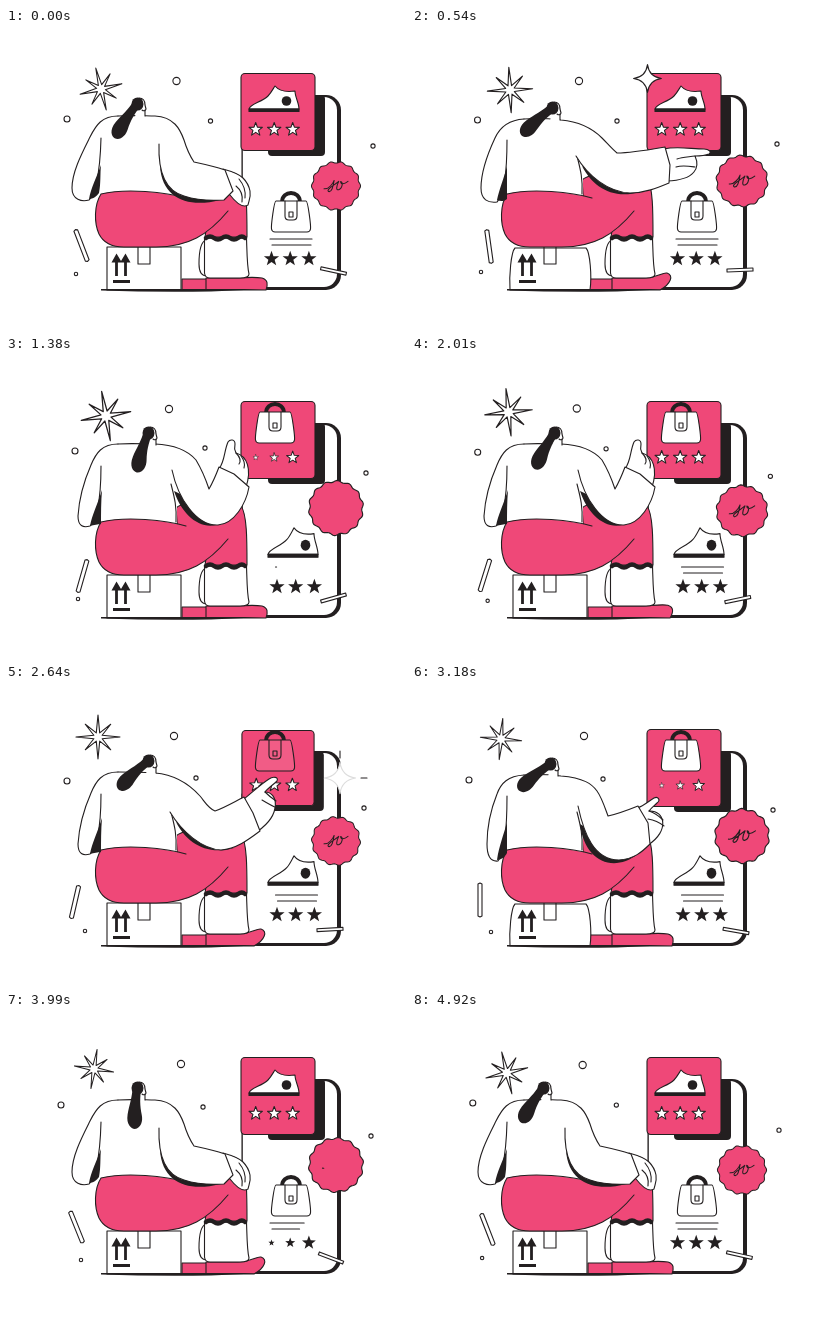
Animation of 400x300 px, one loop 4.95 s. Source, as an HTML page:

```html
<!DOCTYPE html>
<html lang="en">
<head>
<meta charset="utf-8">
<title>Rating products</title>
<style>
html, body { margin: 0; width: 100%; height: 100%; overflow: hidden; background: #fff; }
svg { display: block; width: 100vw; height: 100vh; }
.ln { fill: none; stroke: #231f20; stroke-width: 1.1; stroke-linecap: round; stroke-linejoin: round; }
.w { fill: #fff; }
.p { fill: #ef4878; }
.k { fill: #231f20; }
</style>
</head>
<body>
<svg viewBox="0 0 400 300">
  <g id="phone">
    <rect class="k" x="236" y="67" width="99" height="195" rx="15"/>
    <rect class="w" x="236.6" y="69" width="94.4" height="190" rx="13"/>
    <path class="ln" d="M236 110V252"/>
    <path id="line1" class="ln"/><path id="line2" class="ln"/>
    <g id="phoneStars"></g>
  </g>
  <g id="card">
    <rect class="k" x="262" y="67" width="57" height="61" rx="4"/>
    <rect class="ln p" x="235" y="45.5" width="74" height="77" rx="4"/>
    <g id="cardStars"></g>
  </g>
  <g id="shoe">
    <path class="ln w" d="M-25 9C-24 4-12 2-6-4C-3-7-1-11 1-14C6-8 14-8 21-9C21-3 25 3 25 9Z"/>
    <path class="ln k" d="M-25 9H25V11.500H-25Z"/>
    <circle class="k" cx="12.500" cy="1" r="4.800"/>
  </g>
  <g id="bag">
    <path class="ln" style="stroke-width:3.8" d="M-9-10C-9-22 9-22 9-10"/>
    <path id="bagBody" class="ln" d="M-15-11H15C17-11 20 14 19.500 17Q19 20 16 20H-16Q-19 20-19.500 17C-20 14-17-11-15-11Z"/>
    <path class="ln" d="M-6-11V4Q-6 8-2 8H2Q6 8 6 4V-11M-2 0H2V5H-2Z"/>
  </g>
  <g id="badge">
    <path id="seal" class="ln p"/>
    <path id="scribble" class="ln" pathLength="100"
      d="M-13 3C-8 4-3-3-2-6C-3-1-4 7-8 6C-11 4-3 0 3-5C0 1 0 5 3 4C7 3 8-5 5-5C5-1 9-2 13-5"/>
  </g>
  <g id="legs">
    <path class="ln w" d="M200 212C194 214 193 228 193 236C193 244 196 248 201 248"/>
    <path class="ln p" d="M176 251H204V262H176Z"/>
    <path id="toe" class="ln p"/>
    <path class="ln w" d="M198.500 210V245Q199 250 204 250H234Q243 250 243 246C241 238 241 224 240.500 210Z"/>
    <path class="ln p" d="M170 152C180 143 226 138 235 150C241 158 241 184 241 209H199L201 196L172 180Z"/>
    <path class="ln" style="stroke-width:4.500" d="M200 210Q204 207 208 210T216 210T224 210T232 210T239 210"/>
  </g>
  <path id="box" class="ln w"/>
  <path class="ln" d="M132 219V236H144V219"/>
  <path class="ln" style="stroke-width:2.800;stroke-linecap:butt" d="M110.500 248V230M119.500 248V230M107 253.500H124"/>
  <path class="k" d="M105.500 234.500L110.500 225.500L115 233L119.500 225.500L124.500 234.500Z"/>
  <path class="k" d="M95 261H260L205 263.500Q150 264.500 95 262.500Z"/>
  <path class="w" d="M112 92H150C164 98 171 125 171 148V176H92L94 110Z"/>
  <path class="ln" d="M165 128C168 140 171 150 170 166"/>
  <path class="p" d="M95 166C120 160 160 164 186 172H222V183C202 207 182 219 150 219H118C104 219 97 214 93 206C88 195 88 177 95 166Z"/>
  <path class="ln" d="M180 170C160 164 120 160 95 166C88 177 88 195 93 206C97 214 104 219 118 219H150C182 219 202 207 222 183"/>
  <path id="left" class="ln w"/>
  <path id="sliver" class="k"/>
  <path id="shade" class="k"/>
  <path id="hand" class="ln w"/>
  <path id="crease" class="ln"/>
  <path id="arm" class="ln w"/>
  <g id="head">
    <path class="w" d="M2-6C8-6 8-1 8 1L9 5L8 7V13H-2Z"/>
    <path class="ln" d="M2-6C8-6 8-1 8 1L9 5L8 7V12M5 6Q7 7.500 8 6"/>
    <ellipse class="k" cx="0.500" cy="0" rx="6" ry="6.600"/>
    <path id="tail" class="k" d="M-4.500-1C-4 9-7 18-8 27C-9 37-4 41 0 41C6 40 8 33 6 26C4 18 3 10 4.500-1Z"/>
  </g>
  <g id="floats"></g>
  <path id="sparkle" class="ln w"/>
  <path id="ticks" class="ln"/>
</svg>
<script>
const LOOP = 4950;
const $ = id => document.getElementById(id);
const set = (el, name, value) => el.setAttribute(name, value);
const clamp = v => Math.max(0, Math.min(1, v));
const ramp = (t, start, len) => clamp((t - start) / len);
const ease = p => p < .5 ? 2 * p * p : 1 - 2 * (1 - p) ** 2;
const smooth = p => p * p * (3 - 2 * p);
const lerp = (a, b, k) => a + (b - a) * k;

// Blend two paths that share the same commands
const NUM = /-?\d+(\.\d+)?/g;
function mix(a, b, k) {
  const n = b.match(NUM);
  let i = 0;
  return a.replace(NUM, v => lerp(+v, +n[i++], k).toFixed(2));
}

// Periodic spline through values at shared times
const TIMES = [0, 540, 1380, 2640, 3180, 3990];
function wave(vals, t) {
  const n = TIMES.length;
  const at = i => TIMES[(i + n) % n] + Math.floor(i / n) * LOOP;
  const val = i => vals[(i + n) % n];
  const slope = i => (val(i + 1) - val(i - 1)) / (at(i + 1) - at(i - 1));
  let i = n - 1;
  while (TIMES[i] > t) i--;
  const len = at(i + 1) - at(i), u = (t - at(i)) / len, v = 1 - u;
  return val(i) * (1 + 2 * u) * v * v + slope(i) * len * u * v * v
    + val(i + 1) * u * u * (3 - 2 * u) - slope(i + 1) * len * u * u * v;
}

// 1 when shown; hides and shows twice per loop
const shown = (t, hide1, show1, hide2, show2, len) =>
  1 - ramp(t, hide1, 100) + ramp(t, show1, len) - ramp(t, hide2, 100) + ramp(t, show2, len);

function starPath(points, radii, inner) {
  let d = "";
  for (let i = 0; i < points * 2; i++) {
    const r = i % 2 ? inner : radii[(i / 2) % radii.length];
    const a = Math.PI * i / points;
    d += (i ? "L" : "M") + (r * Math.sin(a)).toFixed(2) + " " + (-r * Math.cos(a)).toFixed(2);
  }
  return d + "Z";
}

function add(parent, tag, cls, attrs) {
  const el = document.createElementNS("http://www.w3.org/2000/svg", tag);
  set(el, "class", cls);
  for (const name in attrs) set(el, name, attrs[name]);
  return parent.appendChild(el);
}

const rest = {
  arm: "M112 88C125 87 140 88 149 88C168 89 174 101 178 112C181 122 184 128 188 134C202 137 210 139 219 142L227 163L218 172C205 173 190 172 178 168C160 163 152 145 153 116",
  hand: "M217 141C228 144 234 147 237 150C240 153 243 158 244 163C245 169 243 172 242 177C237 180 231 176 224 167",
  crease: "M233 151C238 157 240 163 239 170M230 158C235 162 237 168 236 174",
  shade: "M154 138C156 172 184 180 214 172L190 165Z",
  left: "M112 88C96 88 90 97 84 109C76 125 66 144 66 160C66 172 76 174 83 172C88 168 94 150 95 110",
  sliver: "M95 137C91 148 85 160 83 171C87 171 91 168 93 165C95 155 94 146 95 137Z",
  head: "131 76"
};
const point = {
  arm: "M112 91C125 90 140 91 149 92C172 94 184 104 190 110C195 115 200 121 205 125C220 125 236 122 253 119L258 137L257 155C245 160 233 165 218 165C196 164 176 148 164 128",
  hand: "M252 121C264 118 280 121 292 121C297 121 300 124 297 126C292 128 288 128 283 128C288 139 284 152 255 153",
  crease: "M265 131C270 129 276 129 283 128M264 139C270 137 276 138 283 139",
  shade: "M170 138C180 158 200 172 228 164L200 156Z",
  left: "M112 91C96 92 88 99 83 110C76 125 69 145 69 160C69 172 76 175 85 174C90 169 95 152 95 112",
  sliver: "M95 138C92 150 87 162 85 172C89 174 93 173 95 171C95 160 95 149 95 138Z",
  head: "140 80"
};
const think = {
  arm: "M112 88C125 87 140 88 149 88C172 89 184 97 190 104C196 114 200 124 203 133C207 126 210 119 213 111L228 118L243 131C240 148 228 168 212 169C190 170 172 142 166 114",
  hand: "M213 113C219 105 218 95 222 86C224 83 229 83 229 88C228 92 229 95 230 97C241 100 246 113 240 131",
  crease: "M230 97C234 101 235 105 233 108M235 100C238 104 239 109 238 112",
  shade: "M168 135C178 166 208 186 232 152L200 150Z",
  left: "M112 88C96 88 90 97 85 109C78 125 73 144 72 160C72 170 77 172 84 170C89 166 95 150 95 110",
  sliver: "M96 134C92 147 86 159 84 170C88 169 92 168 95 168C95 157 95 146 96 134Z",
  head: "142 77"
};
const tap = {
  arm: "M112 88C125 88 140 88 149 89C172 91 185 102 194 112C199 118 202 124 209 127C218 124 228 118 238 113L247 129L254 147C242 156 230 165 215 166C196 165 176 148 164 128",
  hand: "M238 115C248 107 255 100 263 95C267 92 273 93 271 97C267 101 262 104 259 108C272 108 276 130 252 147",
  crease: "M259 108C263 112 267 115 270 117M256 116C261 119 266 122 271 124",
  shade: point.shade,
  left: think.left,
  sliver: think.sliver,
  head: "142 77"
};
const lift = {
  arm: "M112 91C125 90 140 91 149 92C172 94 180 100 185 107C190 114 193 124 196 132C206 130 216 126 226 122L236 139L238 160C230 168 222 175 207 176C182 176 172 150 166 122",
  hand: "M225 124C232 122 238 116 242 114C246 112 249 116 245 119C242 122 239 124 237 127C253 126 258 147 236 161",
  crease: "M237 127C243 129 247 132 251 136M236 135C242 136 247 138 252 142",
  shade: "M168 140C172 176 200 190 226 170L200 160Z",
  left: "M112 91C96 92 89 99 85 110C79 125 75 144 75 160C75 171 78 178 86 177C91 171 95 152 95 112",
  sliver: "M95 138C92 150 87 162 85 176C89 176 93 173 95 169C95 160 95 149 95 138Z",
  head: "138 80"
};
const KEYS = [[0, rest], [100, rest], [480, point], [640, point], [1050, think], [2150, think],
  [2560, tap], [2760, tap], [3090, lift], [3300, lift], [3700, rest], [LOOP, rest]];

// x, y, rotation and scale of the drifting shapes
const DRIFT = [
  { d: starPath(8, [22, 18], 4.5), x: [95, 98, 100, 92, 89, 88], y: [61, 62, 60, 53, 55, 57], a: [-14, -3, -10, 0, 5, 9], s: [.98, 1.03, 1.14, 1, .94, .9] },
  { r: 3.6, x: [170.5, 167, 163, 168, 172, 175], y: [53, 53, 53, 52, 52, 52] },
  { r: 3, x: [61, 65.5, 69, 61, 57, 55], y: [91, 92, 95, 97, 96, 93] },
  { r: 2.1, x: [204.5, 205, 199, 190, 191, 197], y: [93, 93, 92, 94, 95, 95] },
  { r: 2.1, x: [367, 365, 360, 358, 361, 365], y: [118, 116, 117, 124, 126, 124] },
  { r: 1.7, x: [70, 69, 72, 79, 79, 75], y: [246, 244, 243, 247, 248, 248] },
  { d: "M-2-16L0-17L2-16V16L0 17L-2 16Z", x: [75.5, 77, 76.5, 69, 68, 70.5], y: [217.5, 218.5, 220, 218, 216, 215], a: [-21, -8, 16, 13, 0, -22] },
  { d: "M-13-1.500H13V1.500H-13Z", x: [327.5, 328, 327.5, 324, 324, 325], y: [243, 242, 242, 245.5, 247, 246], a: [12, -2, -16, -3, 10, 21] }
];
for (const f of DRIFT)
  f.el = f.d ? add($("floats"), "path", "ln w", { d: f.d }) : add($("floats"), "circle", "ln w", { r: f.r });

const cardStars = [], phoneStars = [];
for (let i = 0; i < 3; i++) {
  cardStars.push(add($("cardStars"), "path", "ln w", { d: starPath(5, [7], 2.9) }));
  phoneStars.push(add($("phoneStars"), "path", "k", { d: starPath(5, [8], 3.3) }));
}

let seal = "";
for (let i = 0; i < 112; i++) {
  const a = i / 112 * Math.PI * 2, r = 25.7 + .9 * Math.cos(14 * a);
  seal += `${i ? "L" : "M"}${(r * Math.cos(a)).toFixed(2)} ${(r * Math.sin(a)).toFixed(2)}`;
}
set($("seal"), "d", seal + "Z");

function drawWoman(t) {
  let i = 0;
  while (i < KEYS.length - 2 && KEYS[i + 1][0] <= t) i++;
  const [t0, from] = KEYS[i], [t1, to] = KEYS[i + 1];
  const k = smooth(ramp(t, t0, t1 - t0));
  for (const part of ["arm", "hand", "crease", "shade", "left", "sliver"])
    set($(part), "d", mix(from[part], to[part], k));
  set($("head"), "transform", `translate(${mix(from.head, to.head, k)})`);
  set($("tail"), "transform", `rotate(${wave([33, 48, 16, 46, 50, 3], t)})`);

  const squash = clamp(wave([0, 1, 0, 0, 1, 0], t));
  set($("box"), "d", mix("M101 219C101 232 101 248 101 262L175 262C175 248 175 232 175 219Z",
    "M103 220C99 224 97 248 98 262L178 262C180 248 178 224 174 220Z", squash));
  const tapUp = smooth(ramp((1 - Math.cos(t / 1650 * Math.PI * 2)) / 2, .3, .4));
  set($("toe"), "d", mix("M200 250L232 250C244 249 250 249 256 250C262 252 262 256 260 262L200 262Z",
    "M200 250L232 250C246 250 250 244 255 245C262 247 259 256 248 262L200 262Z", tapUp));
}

function drawProducts(t) {
  const first = ramp(t, 600, 550), second = ramp(t, 3330, 600);
  const back = t > 2400, p = back ? second : first;
  const swapped = back ? 1 - ease(second) : ease(first);
  const bump = Math.sin(Math.PI * p);
  const rise = back ? [95, 30] : [30, 60];
  const side = back ? 14 : -14;
  const tilt = back ? -14 : 14;
  set($("shoe"), "transform", `translate(${lerp(268, 287, swapped) + side * bump} ${lerp(72, 188, swapped) - rise[0] * bump})
    rotate(${tilt * bump}) scale(1 ${lerp(1, 1.15, swapped)})`);
  set($("bag"), "transform", `translate(${lerp(285, 269, swapped) - side * bump} ${lerp(184, 67, swapped) - rise[1] * bump})
    rotate(${-tilt * bump})`);
  const blush = ramp(t, 2450, 120) - ramp(t, 2880, 150);
  $("bagBody").style.fill = `rgb(${lerp(255, 241, blush)},${lerp(255, 92, blush)},${lerp(255, 134, blush)})`;

  const press = 1 - .025 * (smooth(ramp(t, 2500, 100)) - smooth(ramp(t, 2700, 120)));
  set($("card"), "transform", `translate(272 84) scale(${press}) translate(-272 -84)`);

  const shift = t > 900 && t < 3600 ? 5.5 : 0;
  for (let i = 0; i < 3; i++) {
    const lag = 25 * i;
    const c = shown(t, 560 + lag, 1340 - lag, 3120 + lag, 3850 - lag, 100);
    const b = shown(t, 560 + lag, 1240 - lag, 3210 + lag, 3950 - lag, 100);
    set(cardStars[i], "transform", `translate(${249.7 + 18.5 * i} 101.5) scale(${c})`);
    set(phoneStars[i], "transform", `translate(${265.5 + shift + 18.7 * i} 230.800) scale(${b})`);
  }
  [[264, 42, 211, 0], [266, 39, 217, 25]].forEach(([x, w, y, lag], i) => {
    const k = shown(t, 560, 1375 + lag, 3210, 3800 + lag, 235);
    const el = $("line" + (i + 1));
    set(el, "d", `M${x + shift} ${y}h${w * k}`);
    set(el, "visibility", k > 0 ? "visible" : "hidden");
  });
}

function drawBadge(t) {
  const r = wave([24, 25.5, 27, 24, 27, 27], t) / 26;
  set($("badge"), "transform", `translate(330 ${wave([158, 153, 152, 157, 152, 153], t)}) scale(${r})`);
  set($("seal"), "transform", `rotate(${wave([0, 8, 16, 4, 12, 18], t)})`);
  const k = shown(t, 620, 1400, 3250, 3985, 400);
  set($("scribble"), "stroke-dasharray", `${100 * k} 200`);
  set($("scribble"), "visibility", k > 0 ? "visible" : "hidden");
}

function drawSparkle(t) {
  const [x, y, size, start, len] = t < 1500 ? [235.5, 50.5, 30, 475, 430] : [334, 94, 27, 2400, 300];
  const p = ramp(t, start, len), r = size * Math.sin(Math.PI * p), q = r * .12;
  const on = p > 0 && p < 1;
  const burst = start > 1500 && p > .6;
  set($("sparkle"), "visibility", on ? "visible" : "hidden");
  set($("ticks"), "visibility", on && burst ? "visible" : "hidden");
  set($("sparkle"), "transform", `translate(${x} ${y})`);
  set($("sparkle"), "d", `M0 ${-r}Q${q} ${-q} ${r} 0Q${q} ${q} 0 ${r}Q${-q} ${q} ${-r} 0Q${-q} ${-q} 0 ${-r}Z`);
  $("sparkle").style.stroke = burst ? "#ddd" : "";
  set($("ticks"), "transform", `translate(${x} ${y})`);
  set($("ticks"), "d", "M0-27V-20M27 0H21");
}

function draw(now) {
  const t = now % LOOP;
  drawWoman(t);
  drawProducts(t);
  drawBadge(t);
  drawSparkle(t);
  for (const f of DRIFT)
    set(f.el, "transform", `translate(${wave(f.x, t)} ${wave(f.y, t)}) rotate(${f.a ? wave(f.a, t) : 0}) scale(${f.s ? wave(f.s, t) : 1})`);
}

const begin = performance.now();
function tick() {
  draw(performance.now() - begin);
  requestAnimationFrame(tick);
}
tick();
</script>
</body>
</html>
```
